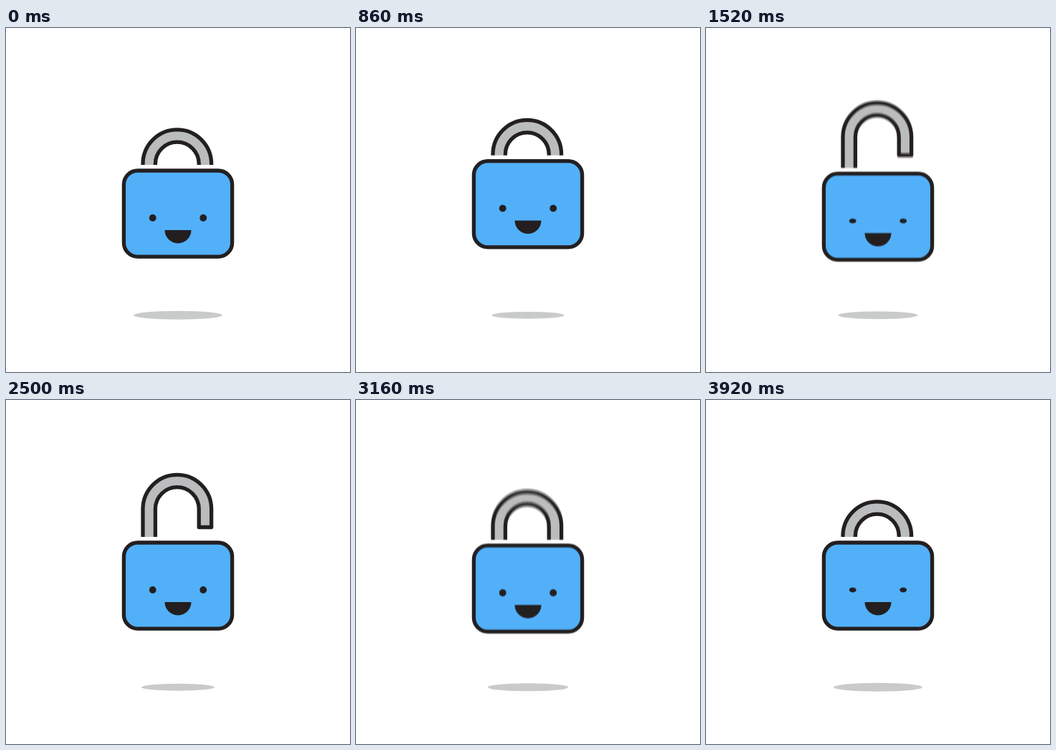
An HTML page with a canvas for the animation above (3940 ms loop, 480 by 480 pixels).

```html
<!DOCTYPE html>
<html lang="en">
<head>
<meta charset="utf-8">
<title>Padlock</title>
<style>
  html, body { margin: 0; width: 100%; height: 100%; overflow: hidden; background: #fff; }
  canvas { display: block; width: 480px; height: 480px; }
</style>
</head>
<body>
<canvas id="stage" width="480" height="480"></canvas>
<script>
const LOOP = 3940, SHUTTER = 20, SAMPLES = 7;
const INK = '#231f20', BLUE = '#52b0f9', STEEL = '#bbbcbd', SHADE = '#c9caca';

const stage = document.getElementById('stage').getContext('2d');
const layer = document.createElement('canvas');
layer.width = layer.height = 480;
const g = layer.getContext('2d');

const smooth = k => (1 - Math.cos(Math.PI * k)) / 2;
const soft = k => (k + smooth(k)) / 2;

// Keys are [time, value, easing towards this key].
const tracks = {
  bob: [[0, 0], [1000, -14], [1300, 26], [1600, 0], [2500, 0], [2960, -13], [3270, 10.5], [3640, 0]],
  lift: [[1100, 0], [1640, 50, soft], [1860, 37.5], [2960, 37.5], [3350, 0]],
  shadow: [[0, 62], [1000, 50], [1300, 78], [1600, 51], [2500, 51], [2960, 45], [3270, 60.5], [3640, 62]],
  eyes: [[1060, 1], [1260, 0.3], [1420, 0.3], [1620, 1], [3740, 1], [3850, 0.15], [3970, 1]],
  mouth: [[1000, 1], [1300, 1.3], [1500, 1]]
};

function valueAt(keys, t) {
  const next = keys.findIndex(key => key[0] > t);
  if (next === 0) return keys[0][1];
  if (next < 0) return keys[keys.length - 1][1];
  const [t0, v0] = keys[next - 1];
  const [t1, v1, ease = smooth] = keys[next];
  return v0 + (v1 - v0) * ease((t - t0) / (t1 - t0));
}

function oval(x, y, rx, ry, color) {
  g.beginPath();
  g.ellipse(x, y, rx, ry, 0, 0, Math.PI * 2);
  g.fillStyle = color;
  g.fill();
}

function outlined(color) {
  g.fillStyle = color;
  g.fill();
  g.stroke();
}

function drawShackle(lift) {
  const cx = 238.8, cy = 189.6, outer = 47.8, inner = 30.4, foot = 215;
  g.save();
  g.beginPath();
  g.rect(150, -100, 180, 291);
  g.clip();
  g.translate(0, -lift);
  g.beginPath();
  g.moveTo(cx - outer, 270);
  g.lineTo(cx - outer, cy);
  g.arc(cx, cy, outer, Math.PI, 0);
  g.lineTo(cx + outer, foot);
  g.lineTo(cx + inner, foot);
  g.lineTo(cx + inner, cy);
  g.arc(cx, cy, inner, 0, Math.PI, true);
  g.lineTo(cx - inner, 270);
  g.closePath();
  outlined(STEEL);
  g.restore();
}

function drawFace(eyes, mouth) {
  for (const x of [204.7, 275.2]) oval(x, 265, 4.9, 4.9 * eyes, INK);
  g.save();
  g.translate(240, 286);
  g.scale(mouth, mouth);
  g.beginPath();
  g.arc(0, -4, 18.5, 0, Math.PI);
  g.fillStyle = INK;
  g.fill();
  g.restore();
}

function drawScene(t) {
  const pose = {};
  for (const name in tracks) pose[name] = valueAt(tracks[name], t);

  g.fillStyle = '#fff';
  g.fillRect(0, 0, 480, 480);
  oval(240, 400.8, pose.shadow, pose.shadow * 0.097, SHADE);

  g.save();
  g.translate(0, pose.bob);
  g.strokeStyle = INK;
  g.lineWidth = 5.3;
  g.lineJoin = 'round';
  drawShackle(pose.lift);
  g.beginPath();
  g.roundRect(164.4, 199, 151.2, 120.2, 19.5);
  outlined(BLUE);
  drawFace(pose.eyes, pose.mouth);
  g.restore();
}

// Averages several moments for vertical motion blur.
function render(t) {
  for (let i = 0; i < SAMPLES; i++) {
    const moment = t + SHUTTER * (i / (SAMPLES - 1) - 0.5);
    drawScene(Math.min(Math.max(moment, 0), LOOP));
    stage.globalAlpha = 1 / (i + 1);
    stage.drawImage(layer, 0, 0);
  }
}

const start = performance.now();
function tick() {
  render((performance.now() - start) % LOOP);
  requestAnimationFrame(tick);
}
tick();
</script>
</body>
</html>
```
